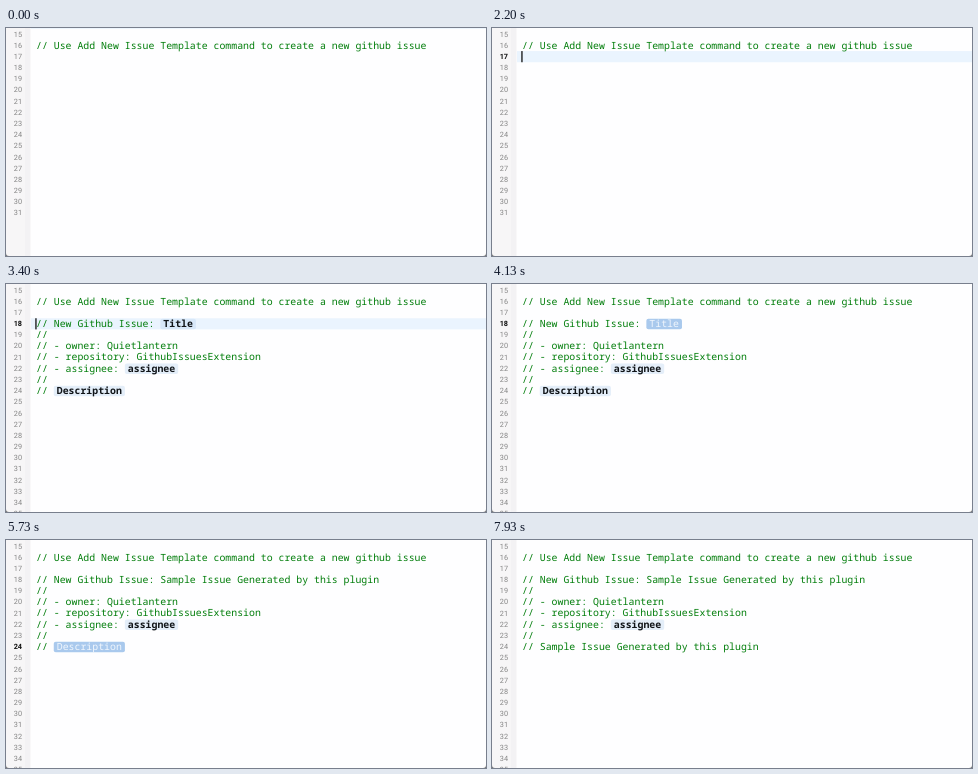
Animation of 480 by 228 pixels, one loop 8 s. Source, as an HTML page:

```html
<!DOCTYPE html>
<html lang="en">
<head>
<meta charset="utf-8">
<title>Issue template in a code editor</title>
<style>
html, body { margin: 0; width: 100%; height: 100%; overflow: hidden; background: #fefeff; }
svg { display: block; width: 480px; height: 228px; }
text { text-rendering: geometricPrecision; }
.code { font: 9.87px "Noto Sans Mono", "DejaVu Sans Mono", monospace; fill: #007d0a; }
.token { font-weight: 600; fill: #101418; }
.token.on { font-weight: 400; fill: #f0f6fd; }
.num { font: 7.3px Roboto, Arial, sans-serif; fill: #858585; text-anchor: end; }
.num.now { font-weight: 700; fill: #111; }
</style>
</head>
<body>
<svg id="stage" viewBox="0 0 480 228"></svg>
<script>
const LOOP = 8000;
const LEFT = 30, CHAR = 5.922, PITCH = 11.17;
const stage = document.getElementById('stage');

const HEADING = '// Use Add New Issue Template command to create a new github issue';
const SAMPLE = 'Sample Issue Generated by this plugin';
const TEMPLATE = [
  { row: 18, text: '// New Github Issue: ', token: 'Title' },
  { row: 19, text: '//' },
  { row: 20, text: '// - owner: Quietlantern' },
  { row: 21, text: '// - repository: GithubIssuesExtension' },
  { row: 22, text: '// - assignee: ', token: 'assignee' },
  { row: 23, text: '//' },
  { row: 24, text: '// ', token: 'Description' }
];

// Each step overrides part of the editor state from its time onward.
const STEPS = [
  [0, { row: 14, col: 0, caret: false, selected: false, inserted: false, filled: [] }],
  [1930, { caret: true }],
  [2070, { row: 15 }],
  [2130, { row: 16 }],
  [2200, { row: 17 }],
  [2270, { row: 18 }],
  [2800, { caret: false }],
  [3330, { caret: true, inserted: true }],
  [3870, { caret: false }],
  [4000, { selected: true }],
  [4600, { selected: false, caret: true, col: 58, filled: [18] }],
  [4870, { selected: true, caret: false, row: 22 }],
  [5000, { row: 24 }],
  [5870, { selected: false, caret: true, col: 40, filled: [18, 24] }],
  [6400, { caret: false }],
  [6600, { row: 0 }]
];

const rowY = row => 11.9 + (row - 16) * PITCH;
const colX = col => LEFT + col * CHAR;

const rect = (x, y, w, h, fill, rx = 0) =>
  `<rect x="${x}" y="${y}" width="${w}" height="${h}" rx="${rx}" fill="${fill}"/>`;
const label = (x, y, cls, str) =>
  `<text x="${x}" y="${y}" class="${cls}">${str}</text>`;
const code = (col, row, str) => label(colX(col), rowY(row) + 8.7, 'code', str);

function token(line, s) {
  const current = s.row === line.row;
  const on = s.selected && current;
  const x = colX(line.text.length);
  const fill = on ? '#a9c9ed' : current ? '#d8e8f9' : '#e4eef9';
  return rect(x, rowY(line.row) + 0.5, line.token.length * CHAR + 6, 10.5, fill, 2) +
    label(x + 3, rowY(line.row) + 8.7, 'code token' + (on ? ' on' : ''), line.token);
}

function templateLine(line, s) {
  if (!line.token) return code(0, line.row, line.text);
  if (s.filled.includes(line.row)) return code(0, line.row, line.text + SAMPLE);
  return code(0, line.row, line.text) + token(line, s);
}

function draw(s) {
  let out = rect(0, 0, 480, 228, '#fefeff');
  out += rect(0, 0, 19, 228, '#f7f6f7') + rect(19, 0, 5.5, 228, '#f3f2f4');
  if (!s.selected) out += rect(25, rowY(s.row), 455, PITCH, '#eaf4fe');

  const last = s.inserted ? 35 : 31;
  for (let row = 15; row <= last; row++) {
    out += label(16, rowY(row) + 7.9, row === s.row ? 'num now' : 'num', row);
  }

  out += code(0, 16, HEADING);
  if (s.inserted) out += TEMPLATE.map(line => templateLine(line, s)).join('');
  if (s.caret) out += rect(colX(s.col) - 0.7, rowY(s.row), 1.3, PITCH, '#111');

  // Rounded lower corners of the window
  out += '<path d="M0 225Q0 228 3 228H0ZM480 225Q480 228 477 228H480Z" fill="#777"/>';
  stage.innerHTML = out;
}

let shown = -1;
function update(t) {
  const count = STEPS.filter(([at]) => at <= t).length;
  if (count === shown) return;
  shown = count;
  draw(Object.assign({}, ...STEPS.slice(0, count).map(step => step[1])));
}

const start = performance.now();
function tick() {
  update((performance.now() - start) % LOOP);
  requestAnimationFrame(tick);
}
tick();
</script>
</body>
</html>
```
